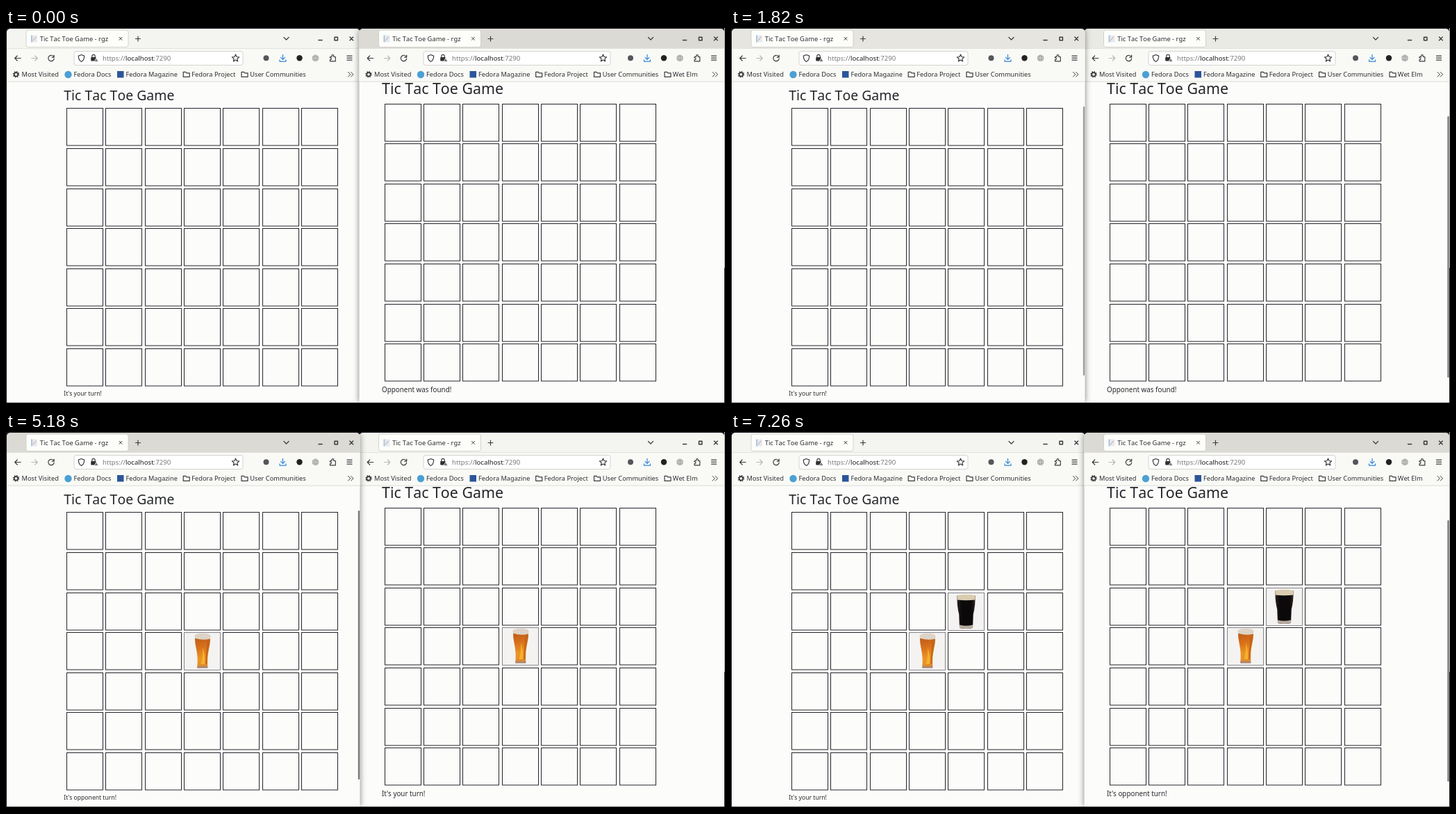
Animation of 1035 by 541 pixels, one loop 8 s. Source, as an HTML page:

```html
<!DOCTYPE html>
<html lang="en">
<head>
<meta charset="utf-8">
<title>Tic Tac Toe Game</title>
<style>
  html, body { margin: 0; width: 100%; height: 100%; overflow: hidden; background: #16161c; }
  svg { display: block; width: 1035px; height: 541px; }
  text { font-family: "Noto Sans", "Open Sans", sans-serif; font-kerning: none; white-space: pre; }
  .line { fill: none; stroke: #3a3b3e; stroke-width: 1.2; stroke-linecap: round; stroke-linejoin: round; }
  .cell { fill: none; stroke: #25242c; stroke-width: 1; }
  .shade { filter: drop-shadow(0 0 4px rgba(0, 0, 0, .5)); }
</style>
</head>
<body>
<svg id="stage" viewBox="0 0 1035 541" xmlns="http://www.w3.org/2000/svg">
  <defs>
    <linearGradient id="ale" x2=".15" y2="1">
      <stop offset="0" stop-color="#b9581a"/>
      <stop offset=".4" stop-color="#d8701a"/>
      <stop offset=".75" stop-color="#ec9722"/>
      <stop offset="1" stop-color="#dd8a2b"/>
    </linearGradient>
    <linearGradient id="dark">
      <stop offset="0" stop-color="#2a211f"/>
      <stop offset=".25" stop-color="#0c090a"/>
      <stop offset=".8" stop-color="#0c090a"/>
      <stop offset="1" stop-color="#332824"/>
    </linearGradient>
  </defs>
</svg>
<script>
const LOOP = 8000;
const stage = document.getElementById('stage');

function add(parent, tag, attrs = {}, text) {
  const el = document.createElementNS('http://www.w3.org/2000/svg', tag);
  for (const k in attrs) el.setAttribute(k, attrs[k]);
  if (text !== undefined) el.textContent = text;
  parent.appendChild(el);
  return el;
}
const box = (p, x, y, width, height, fill, more) => add(p, 'rect', { x, y, width, height, fill, ...more });
const dot = (p, cx, cy, r, fill, more) => add(p, 'circle', { cx, cy, r, fill, ...more });
const label = (p, x, y, size, text, fill = '#2c2d30') =>
  add(p, 'text', { x, y, 'font-size': size, fill }, text);
const line = (p, x, y, d, more) =>
  add(p, 'path', { d, class: 'line', transform: `translate(${x} ${y})`, ...more });

function gear(p, x, y) {
  dot(p, x, y, 2.7, 'none', { stroke: '#333', 'stroke-width': 1.6 });
  dot(p, x, y, 4, 'none', { stroke: '#333', 'stroke-width': 1.5, 'stroke-dasharray': '1.57 1.57' });
}

const folder = (p, x, y) => line(p, x, y, 'M-4.5 3.5V-3.5H-1L.3-2H4.5V3.5Z');

function star(p, x, y) {
  const pts = Array.from({ length: 10 }, (_, i) => {
    const r = i % 2 ? 2.5 : 5.4, a = i * Math.PI / 5;
    return `${(r * Math.sin(a)).toFixed(2)} ${(-r * Math.cos(a)).toFixed(2)}`;
  });
  line(p, x, y, `M${pts.join('L')}Z`);
}

function drawTab(p, x) {
  box(p, x, 3, 147, 24.5, '#fdfefa', { rx: 3, stroke: '#c9c9c6', 'stroke-width': .8 });
  box(p, x + 7, 10.5, 9, 10, '#e6ebef');
  box(p, x + 7, 10.5, 2, 10, '#a9c7e4');
  line(p, x + 10, 18, 'M0 0L4-5', { style: 'stroke:#d59a88;stroke-width:1' });
  label(p, x + 19.7, 19, 9.35, 'Tic Tac Toe Game - rgz');
  line(p, x + 136, 15.3, 'M-2-2L2 2M2-2L-2 2', { style: 'stroke-width:1' });
  line(p, x + 161, 15.5, 'M-3.5 0H3.5M0-3.5V3.5');
}

function drawTools(p, x, urlX, urlEnd, right) {
  line(p, right - 106, 15, 'M-3.5-1.5L0 2L3.5-1.5');
  line(p, right - 57, 17.5, 'M-2.5 0H2.5', { style: 'stroke-width:1.6' });
  line(p, right - 34.3, 15.5, 'M-2.2-2.2H2.2V2.2H-2.2Z', { style: 'stroke-width:1.5' });
  line(p, right - 12.2, 15.3, 'M-2.4-2.4L2.4 2.4M2.4-2.4L-2.4 2.4', { style: 'stroke-width:1.4' });

  line(p, x + 16, 43.5, 'M4.3 0H-4.3M-.8-3.5L-4.3 0L-.8 3.5');
  line(p, x + 40, 43.5, 'M-4.3 0H4.3M.8-3.5L4.3 0L.8 3.5', { style: 'stroke:#b9bab8' });
  line(p, x + 64, 43.5, 'M3.2-2.8A4.2 4.2 0 1 0 4.2 .6M4.2-4.4V-1.4H1.2');

  box(p, urlX, 33.5, urlEnd - urlX, 20, '#fff', { rx: 3, stroke: '#cfcfcf', 'stroke-width': .9 });
  line(p, urlX + 10.5, 43.5, 'M0-5L4.2-3.4C4.2 1 3 3.5 0 5C-3 3.5-4.2 1-4.2-3.4Z');
  line(p, urlX + 28, 43, 'M-2.2-1V-2.5A2.2 2.2 0 0 1 2.2-2.5V-1');
  box(p, urlX + 24.2, 42, 7.6, 5.4, '#303134', { rx: 1 });
  add(p, 'path', { d: 'M0-3L3 2.5H-3Z', fill: '#77776f', stroke: '#fff', 'stroke-width': .8,
    transform: `translate(${urlX + 32} 46)` });
  const url = label(p, urlX + 41, 47, 9.6, '', '#77787a');
  add(url, 'tspan', {}, 'https://');
  add(url, 'tspan', { fill: '#1c1c20', 'font-weight': 500 }, 'localhost');
  add(url, 'tspan', {}, ':7290');
  star(p, urlEnd - 10.5, 43.5);

  dot(p, right - 135, 43.3, 4, '#55565a');
  line(p, right - 111, 43.3, 'M0-5V2M-3-1L0 2L3-1M-4.5 2.5V4.8H4.5V2.5', { style: 'stroke:#3284dc' });
  dot(p, right - 87, 43.3, 4.2, '#222');
  dot(p, right - 64, 43.3, 4.8, '#a1a2a2');
  line(p, right - 64, 43.3, 'M-4.5 0H4.5M0-4.5V4.5M-2-4Q-4 0-2 4M2-4Q4 0 2 4',
    { style: 'stroke:#e5e5e3;stroke-width:.6' });
  line(p, right - 39, 43.5,
    'M-4-2H-1.5V-3.5A1.4 1.4 0 0 1 1.3-3.5V-2H3.8V4.3H-4V2H-3A1.3 1.3 0 0 0-3-.5H-4Z');
  line(p, right - 15, 43.2, 'M-3.5-3H3.5M-3.5 0H3.5M-3.5 3H3.5');
}

function drawBookmarks(p, x, right, extra) {
  const y = 70;
  gear(p, x + 13.5, 66.8);
  label(p, x + 21.5, y, 9.3, 'Most Visited');
  dot(p, x + 88.5, 67, 5.2, '#4aa0d5');
  label(p, x + 96.5, y, 9.25, 'Fedora Docs');
  box(p, x + 159, 62, 9.5, 9.5, '#2b5599');
  label(p, x + 171.5, y, 9.2, 'Fedora Magazine');
  folder(p, x + 258.7, 66.8);
  label(p, x + 266.2, y, 9.25, 'Fedora Project');
  folder(p, x + 342.5, 66.8);
  label(p, x + 350.2, y, 9.25, 'User Communities');
  if (extra) {
    folder(p, x + 444, 66.8);
    label(p, x + 451.3, y, 9.25, extra);
  }
  line(p, right - 13, 66.8, 'M-4-3.3L-.7 0L-4 3.3M.2-3.3L3.5 0L.2 3.3', { style: 'stroke-width:1' });
}

function drawGlass(p, x, y, kind) {
  const g = add(p, 'g', { transform: `translate(${x} ${y})` });
  box(g, .5, .5, 52, 54, '#f4f3f1', { stroke: '#83828a', 'stroke-width': .8 });
  const shape = (d, fill) => add(g, 'path', { d, fill });
  if (kind === 'ale') {
    shape('M16 6H38Q38.5 15 36 25Q33.5 36 34.3 51H19.3Q20.5 36 18 25Q15.5 15 16 6Z', 'url(#ale)');
    shape('M33 10H37.5Q37 18 35 26Q33 36 33.5 46H31.5Q31 36 32.5 26Z', '#c2641c');
    shape('M27 22Q31 34 30 46H24.5Q28 36 27 22Z', '#f7b02f');
    shape('M15.3 5Q18 1.5 27 1.8Q36 1.5 38.5 5L38 9.5Q28 12.5 16 8.8Z', '#ddd3c6');
    shape('M19.4 48.5Q27 50.5 34.2 48.5V51.8H19.3Z', '#a8877b');
  } else {
    shape('M13.5 4H39.5Q40 19 36.8 31L36 51Q26 53 17 51L16.2 31Q13 19 13.5 4Z', 'url(#dark)');
    shape('M13.5 4Q26 1.5 39.5 4L39.3 10.5Q26 12 13.7 10.5Z', '#d9ccb0');
    shape('M17 46.5Q26 49 36.1 46.5L36 51Q26 53 17 51Z', '#b7aaa0');
  }
  return g;
}

function makeWindow(o) {
  const p = add(stage, 'g');
  const { x, right } = o;
  const top = `V7Q${x} 1 ${x + 6} 1H${right - 6}Q${right} 1 ${right} 7V`;
  add(p, 'path', { d: `M${x} 539${top}539Z`, fill: '#fcfdfa', class: 'shade' });
  const bar = add(p, 'path', { d: `M${x} 29.5${top}29.5Z` });
  box(p, x, 29.5, right - x, 47.5, '#f9faf6');
  box(p, x, 29, right - x, .8, '#dededb');
  box(p, x, 76.7, right - x, .8, '#d3d4d2');
  drawTab(p, o.nav + 28);
  drawTools(p, o.nav, o.url, o.urlEnd, right);
  drawBookmarks(p, o.nav, right, o.extra);

  label(p, o.textX, o.titleY, o.titleSize, 'Tic Tac Toe Game', '#25262b');
  const cellX = c => Math.round(o.gridX + 56.35 * c);
  const cellY = r => Math.round(o.gridY + 57.6 * r);
  for (let r = 0; r < 7; r++)
    for (let c = 0; c < 7; c++)
      add(p, 'rect', { x: cellX(c) + .5, y: cellY(r) + .5, width: 52, height: 53.5, class: 'cell' });
  const ale = drawGlass(p, cellX(3), cellY(3), 'ale');
  const stout = drawGlass(p, cellX(4), cellY(2), 'stout');
  const status = label(p, o.textX, o.statusY, o.statusSize, '', '#25262b');
  const thumb = box(p, right - 2.7, o.thumbY, 2.4, o.thumbH, '#77787a', { rx: 1 });
  return { p, bar, ale, stout, status, thumb };
}

// Light desktop strip beside the right window
box(stage, 1034, 0, 1, 345, '#c4c4c4');

const left = makeWindow({
  x: 1, right: 509.5, nav: 1, url: 98, urlEnd: 341, textX: 83.3,
  titleY: 103.5, titleSize: 19.45, gridX: 86.8, gridY: 115.4,
  statusY: 529, statusSize: 8.6, thumbY: 113, thumbH: 387
});
const right = makeWindow({
  x: 508.5, right: 1034, nav: 508.5, url: 601, urlEnd: 870, textX: 541,
  titleY: 95.2, titleSize: 21.4, gridX: 544.6, gridY: 108.6,
  statusY: 523.5, statusSize: 9.85, thumbY: 127, thumbH: 376, extra: 'Wet Elm'
});

const MINE = "It's your turn!", THEIRS = "It's opponent turn!";
const tracks = {
  front: [[0, 'right'], [1700, 'left'], [6980, 'right']],
  leftFocus: [[0, 0], [1820, .6], [1940, 1], [7060, .5], [7180, 0]],
  leftText: [[0, MINE], [2080, THEIRS], [7260, MINE]],
  rightText: [[0, 'Opponent was found!'], [2120, MINE], [7180, THEIRS]],
  leftThumb: [[0, 0], [1699, 0], [1700, .4], [1940, 1], [6140, 1], [6860, 0], [LOOP, 0]],
  rightThumb: [[0, 0], [1699, 0], [1700, 1], [1820, 1], [2120, .15], [2400, 0],
    [6860, 0], [7100, 1], [LOOP, 1]]
};

const hold = (track, t) => track.filter(k => k[0] <= t).pop()[1];
function ease(track, t) {
  const i = track.findIndex(k => k[0] > t);
  const [t0, a] = track[i - 1], [t1, b] = track[i];
  return a + (b - a) * (t - t0) / (t1 - t0);
}
const tint = k => {
  const mix = (a, b) => Math.round(a + (b - a) * k);
  return `rgb(${mix(244, 220)},${mix(245, 218)},${mix(240, 212)})`;
};
const show = (el, on) => { el.style.display = on ? '' : 'none'; };

function render(t) {
  const front = hold(tracks.front, t) === 'left' ? left : right;
  if (stage.lastElementChild !== front.p) stage.appendChild(front.p);
  const focus = hold(tracks.leftFocus, t);
  left.bar.setAttribute('fill', tint(focus));
  right.bar.setAttribute('fill', tint(1 - focus));
  left.status.textContent = hold(tracks.leftText, t);
  right.status.textContent = hold(tracks.rightText, t);
  left.thumb.setAttribute('opacity', ease(tracks.leftThumb, t));
  right.thumb.setAttribute('opacity', ease(tracks.rightThumb, t));
  show(left.ale, t >= 2080);
  show(right.ale, t >= 2120);
  show(right.stout, t >= 7180);
  show(left.stout, t >= 7260);
}

const start = performance.now();
function tick() {
  render((performance.now() - start) % LOOP);
  requestAnimationFrame(tick);
}
tick();
</script>
</body>
</html>
```
